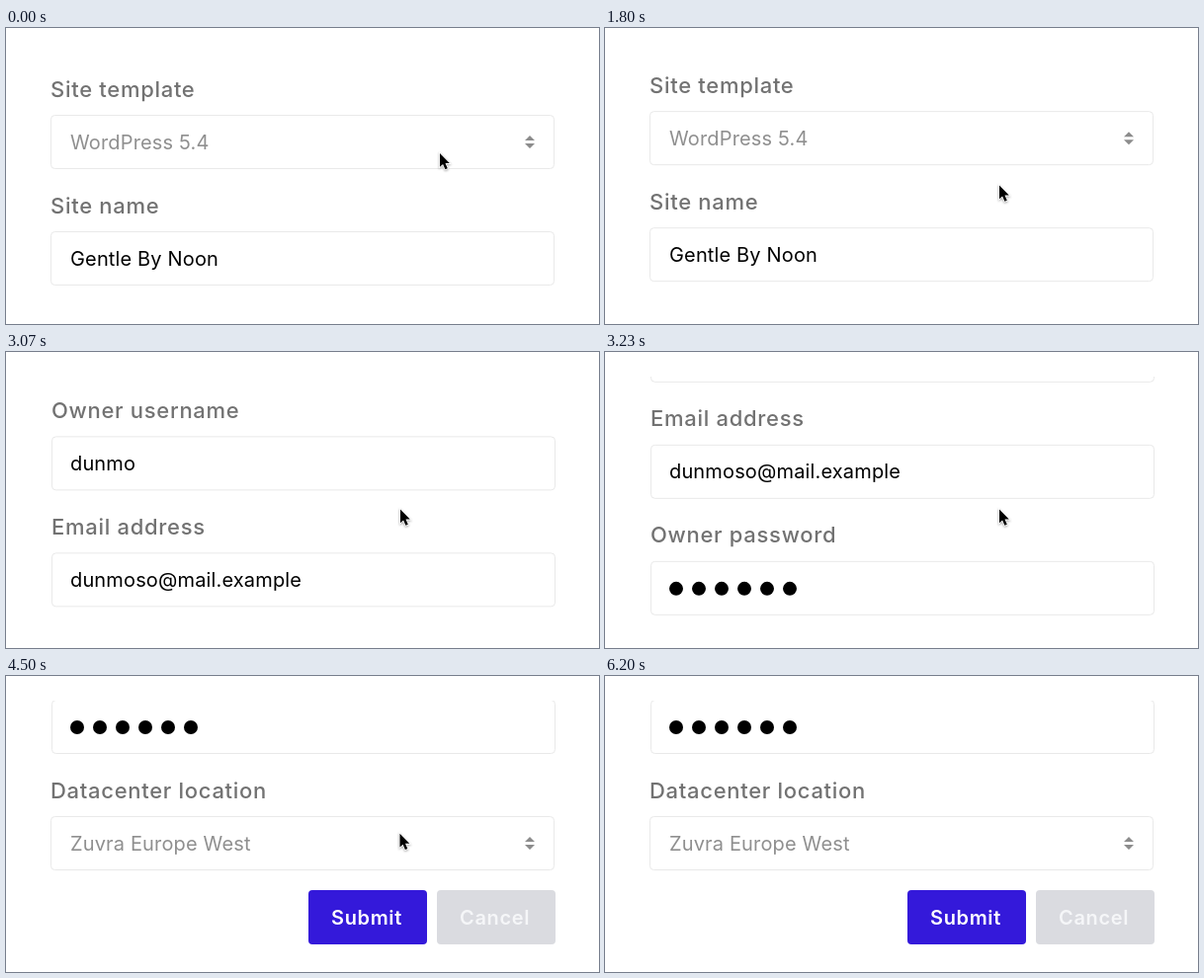
Recreate the animation shown at these times as an HTML page. Size 600 by 300 pixels, loop 6.71 s.

```html
<!DOCTYPE html>
<html lang="en">
<head>
<meta charset="utf-8">
<title>Site form</title>
<style>
  html, body { margin: 0; width: 100%; height: 100%; overflow: hidden; background: #fff; }
  svg { display: block; width: 100%; height: 100%; }
  text { font: 400 20px Inter, "Open Sans", sans-serif; letter-spacing: .15px; white-space: pre; }
  .label { font-size: 22px; font-weight: 500; letter-spacing: .7px; fill: #727272; }
  .muted { fill: #8f8f8f; }
  .button { font-weight: 600; letter-spacing: .65px; }
  .box { fill: #fff; stroke: #e9e9e9; }
  .arrows { fill: #8c8c8c; }
  #pointer { filter: drop-shadow(0 1px 1px rgba(0, 0, 0, .35)); }
</style>
</head>
<body>
<svg viewBox="0 0 600 300">
  <clipPath id="view"><rect x="0" y="25" width="600" height="247"/></clipPath>
  <g clip-path="url(#view)"><g id="form"></g></g>
  <path id="pointer" d="M0 0V13.8L3.1 11L5.4 16.3L7.8 15.3L5.5 10.1H9.8Z" stroke="#fff" stroke-width="1.6" paint-order="stroke"/>
</svg>
<script>
const LOOP = 6710, ROW = 118, FIRST = 88;
const form = document.getElementById('form');
const pointer = document.getElementById('pointer');

const fields = [
  { x: 45, label: 'Site template', value: 'WordPress 5.4', select: true },
  { x: 45, label: 'Site name', value: 'Gentle By Noon' },
  { x: 46, label: 'Owner username', value: 'dunmo' },
  { x: 46, label: 'Email address', value: 'dunmoso@mail.example' },
  { x: 46, label: 'Owner password', dots: 6 },
  { x: 45, label: 'Datacenter location', value: 'Zuvra Europe West', select: true }
];

function drawField({ x, label, value, select, dots = 0 }, i) {
  const y = FIRST + i * ROW;
  let out = `<text class="label" x="${x}" y="${y - 18.5}">${label}</text>
    <rect class="box" x="${x + .5}" y="${y + .5}" width="509" height="54" rx="4"/>`;
  if (value) out += `<text class="${select ? 'muted' : ''}" x="65" y="${y + 34.5}">${value}</text>`;
  if (select) out += `<path class="arrows" d="M525 ${y + 26}l5-5l5 5zM525 ${y + 29}l5 5l5-5z"/>`;
  for (let k = 0; k < dots; k++) out += `<circle cx="${72 + 23 * k}" cy="${y + 28}" r="7"/>`;
  return out;
}

const drawButton = (x, label, back, ink) =>
  `<rect x="${x}" y="753" width="120" height="55" rx="4" fill="${back}"/>
   <text class="button" x="${x + 23}" y="788" fill="${ink}">${label}</text>`;

form.innerHTML = fields.map(drawField).join('') +
  drawButton(306, 'Submit', '#3419da', '#fff') +
  drawButton(436, 'Cancel', '#dadbe0', '#f5f6f8');

// Each scroll follows a sine ease, refreshed only at the listed ticks.
const scrolls = [
  { from: 0, to: 118, start: 1770, end: 2030, ticks: [1800, 1830, 1900, 2030] },
  { from: 118, to: 236, start: 2446, end: 2670, ticks: [2530, 2600, 2670] },
  { from: 236, to: 354, start: 3050, end: 3260, ticks: [3070, 3130, 3230, 3370] },
  { from: 354, to: 536, start: 3792, end: 4030, ticks: [3830, 3870, 3910, 3950, 3990, 4030] }
];

const sine = p => (1 - Math.cos(Math.PI * p)) / 2;
const cubic = p => p < .5 ? 4 * p ** 3 : 1 - 4 * (1 - p) ** 3;
const mix = (a, b, p) => a + (b - a) * p;
const clamp = p => Math.min(1, Math.max(0, p));

function scrollAt(t) {
  let y = 0;
  for (const s of scrolls) {
    const tick = s.ticks.filter(k => k <= t).pop();
    if (tick) y = mix(s.from, s.to, sine(clamp((tick - s.start) / (s.end - s.start))));
  }
  return y;
}

// Progress in n equal steps, the first at start and the last at end.
const stepped = (t, start, end, n) =>
  clamp((Math.floor((t - start) * (n - 1) / (end - start) + 1e-6) + 1) / n);

const bend = (a, c, b, p) => mix(mix(a, c, p), mix(c, b, p), p);

function pointerAt(t) {
  if (t < 4500) {
    const p = sine(stepped(t, 1270, 1600, 10));
    return [mix(439, 399, p), mix(127, 159.5, p)];
  }
  if (t < 6000) {
    const p = cubic(stepped(t, 4500, 5000, 13));
    return [bend(399, 262, 341, p), bend(159.5, 225, 237.5, p)];
  }
  const p = stepped(t, 6000, 6200, 5) ** 2;
  return [mix(341, 606, p), mix(237.5, 320, p)];
}

function render(t) {
  form.setAttribute('transform', `translate(0 ${-scrollAt(t).toFixed(2)})`);
  const [x, y] = pointerAt(t);
  pointer.setAttribute('transform', `translate(${x.toFixed(2)} ${y.toFixed(2)})`);
  pointer.setAttribute('visibility', t < 6200 ? 'visible' : 'hidden');
}

const begin = performance.now();
function frame() {
  render((performance.now() - begin) % LOOP);
  requestAnimationFrame(frame);
}
frame();
</script>
</body>
</html>
```
